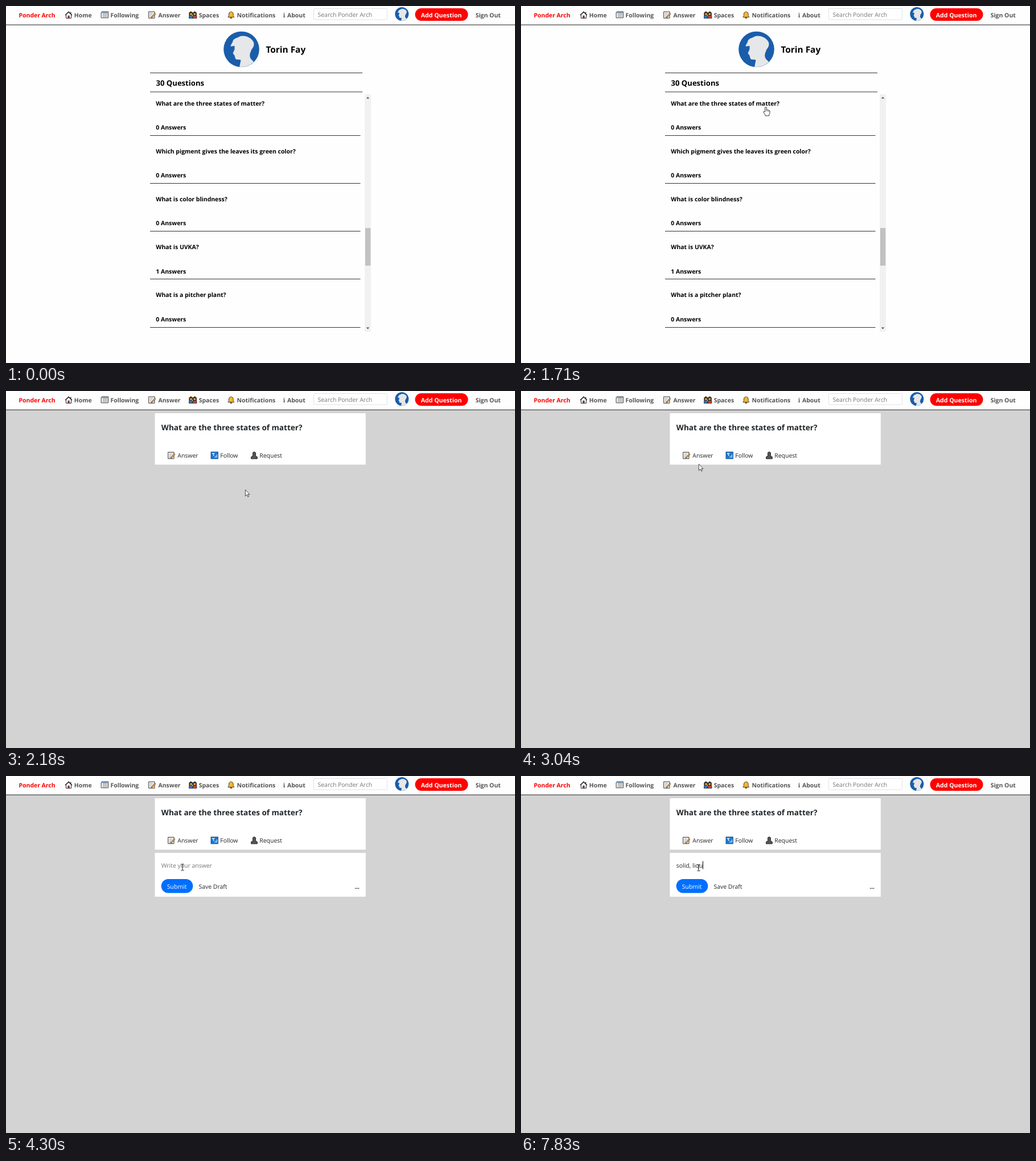
Animation of 894 by 627 pixels, one loop 8000 ms. Source, as an HTML page:

```html
<!DOCTYPE html>
<html lang="en">
<head>
<meta charset="utf-8">
<title>Question page</title>
<style>
html, body { margin: 0; width: 100%; height: 100%; overflow: hidden; background: #fefefe; }
svg { display: block; }
text { font: 10.45px "Open Sans", "Noto Sans", sans-serif; fill: #212529; text-rendering: geometricPrecision; white-space: pre; }
.b { font-weight: 700; fill: #000; }
.nav { font-weight: 700; fill: #555; }
.soft { fill: #757575; }
.line { fill: #333; }
</style>
</head>
<body>
<svg width="894" height="627" viewBox="0 0 894 627">
  <defs>
    <clipPath id="disc"><circle r="31"/></clipPath>
    <g id="avatar">
      <circle r="31.3" fill="#1a5dab"/>
      <path clip-path="url(#disc)" fill="#e6e7e9" d="M-19-5C-18-10-15-12-15-15C-12-20-6-20-2-23C6-25 15-21 19-16C24-11 22-4 18 0C16 5 14 9 15 13C16 18 20 20 23 23L16 34H-4L-1 19C-4 17-10 20-11 15L-12 11L-15 7L-12 0V-6Z"/>
    </g>
    <g id="memo" stroke-linejoin="round">
      <path d="M.7 1H11V12.3H.7Z" fill="#fff" stroke="#333"/>
      <path d="M2.5 3.5H8M2.5 5.7H7M2.5 7.9H5.5M2.5 10H5" stroke="#888" stroke-width=".8"/>
      <path d="M5.5 9.8L11.2 3.2L13 4.8L7.3 11L5 11.6Z" fill="#f2a33a" stroke="#333" stroke-width=".7"/>
    </g>
    <g id="arrow"><path d="M.4.4V11.6L3 9.1L4.8 12.9L6.4 12.2L4.7 8.5H8Z" fill="#fff" stroke="#222" stroke-width=".8"/></g>
    <g id="hand"><path d="M-1.3 9V1.2Q0-.5 1.3 1.2V5.2Q2.8 4.6 3.3 5.8Q4.8 5.2 5.2 6.4Q7 6 7 7.7V11Q6.7 13 5.6 14V15.8H-.9V14.2L-4.2 9.6Q-4.3 7.6-2.5 8.3Z" fill="#fff" stroke="#222" stroke-width=".9"/>
      <path d="M1.3 5V8M3.3 6V8.5M5.2 6.5V9" stroke="#222" stroke-width=".6"/></g>
    <g id="beam"><path d="M-2.7-5.2H-.6L0-4.7L.6-5.2H2.7M-2.7 5.6H-.6L0 5.1L.6 5.6H2.7M0-4.7V5.1" fill="none" stroke="#222"/></g>
  </defs>

  <rect id="back" y="33" width="894" height="594" fill="#d3d3d3"/>
  <rect width="894" height="33" fill="#fefefe"/>
  <rect class="line" y="32.6" width="894" height="1.1"/>

  <text class="nav" x="22.5" y="19.5" style="fill:#f00">Ponder Arch</text>
  <g id="nav"></g>
  <g transform="translate(103.5 9)" stroke="#222">
    <path d="M2 6V12.4H11V6L6.5 1.8Z" fill="#fff"/>
    <path d="M.5 7L6.5 1.2L12.5 7M10.3 4.5V1.5" fill="none" stroke-width="1.2"/>
    <path d="M5.3 12V8.2H7.8V12" fill="#b33" stroke-width=".7"/>
  </g>
  <g transform="translate(166.5 9)">
    <path d="M2 .8H13V11.8H.6V2.5H2Z" fill="#eee" stroke="#444"/>
    <path d="M3 2.7H12" stroke="#4a7fae" stroke-width="1.6"/>
    <path d="M3 5.2H12M3 7.3H12M3 9.5H12M5.5 4V11M8.8 4V11" stroke="#999" stroke-width=".7"/>
  </g>
  <use href="#memo" x="250" y="9"/>
  <g transform="translate(321 9)" stroke="#222" stroke-width=".8">
    <path d="M.5 12.5V9Q4 5.5 7 9.2V12.5Z" fill="#2b78c5"/>
    <path d="M7 12.5V9.2Q10.5 5.5 14 9V12.5Z" fill="#d4472f"/>
    <path d="M.8 8V3Q3.7-1.2 6.7 3V6Z" fill="#3b2618"/>
    <path d="M7.5 8V3Q10.4-1.2 13.4 3V8Z" fill="#3b2618"/>
    <circle cx="4" cy="5.2" r="2.3" fill="#f3a83b"/>
    <circle cx="10.3" cy="5.2" r="2.3" fill="#f3a83b"/>
  </g>
  <g transform="translate(389 9)" stroke="#333" stroke-width=".9">
    <circle cx="6.3" cy="11.3" r="1.6" fill="#d98a1c"/>
    <path d="M.8 10.6L2.4 8.4V5Q2.6 1.8 5.4 1.5Q6.3-.2 7.2 1.5Q10 1.8 10.2 5V8.4L11.8 10.6Z" fill="#fdb827"/>
  </g>
  <text class="nav" x="486.7" y="19.5" style="font-family:'Noto Serif',serif">i</text>
  <rect x="540.5" y="4.5" width="129" height="19.5" rx="2" fill="#fff" stroke="#dfe2e5"/>
  <text class="soft" x="547.5" y="19">Search Ponder Arch</text>
  <use href="#avatar" transform="translate(695.3 14) scale(.383)"/>
  <rect x="718.5" y="4" width="93" height="22" rx="11" fill="#f00"/>
  <text class="nav" x="728.7" y="19.5" style="fill:#fff;font-size:10.6px">Add Question</text>

  <g id="list">
    <use href="#avatar" x="413.5" y="76"/>
    <text class="b" x="456.5" y="82" style="font-size:15.4px">Torin Fay</text>
    <rect class="line" x="253" y="117" width="373" height="1"/>
    <text class="b" x="263.5" y="139.8" style="font-size:13.1px">30 Questions</text>
    <rect class="line" x="253" y="150.4" width="373" height="1"/>
    <g id="rows"></g>
    <rect id="under" x="263.5" y="175.6" width="189.5" height="1"/>
    <rect x="630" y="155" width="11" height="417" fill="#f1f1f1"/>
    <rect x="631" y="390" width="9.3" height="66" fill="#c1c1c1"/>
    <path d="M632.8 162.5h5.4l-2.7-3zM632.8 564.5h5.4l-2.7 3z" fill="#505050"/>
  </g>

  <g id="ask">
    <rect x="261.5" y="39" width="370.3" height="90.3" fill="#fff"/>
    <text class="b" x="272.8" y="68.8" style="font-size:13.55px;fill:#212529">What are the three states of matter?</text>
    <rect id="hover" x="272.7" y="100" width="75.3" height="25" rx="12.5" fill="#d3d3d3"/>
    <use href="#memo" x="284" y="106.5"/>
    <text x="301.3" y="117">Answer</text>
    <rect x="360" y="107" width="12.3" height="12" fill="#1479d8" stroke="#1a3f66" stroke-width=".8"/>
    <path d="M362 109.5L366 113.5M362 109.5H367M364.5 109.5V114M366.5 117V115.5M368.5 117V113.8M370.5 117V111.5" stroke="#fff" stroke-width=".9"/>
    <text x="376.3" y="117">Follow</text>
    <path d="M430.6 119V116Q431.5 114.2 434 113.8Q432 107 436 107Q440 107 438 113.8Q440.5 114.2 441.3 116V119Z" fill="#555" stroke="#222"/>
    <text x="445.3" y="117">Request</text>
  </g>

  <g id="panel">
    <rect x="261.5" y="135" width="370.3" height="77" fill="#fff"/>
    <text id="hint" class="soft" x="272.8" y="161">Write your answer</text>
    <text id="typed" x="272.8" y="161"></text>
    <rect id="caret" y="149.5" width="1" height="14" fill="#000"/>
    <rect x="272.7" y="181" width="55.6" height="24.5" rx="12.25" fill="#006fff"/>
    <text x="282.8" y="197.7" style="fill:#fff">Submit</text>
    <text x="338.5" y="197.7">Save Draft</text>
    <text class="b" x="612.6" y="197.7" style="font-size:9.6px">...</text>
  </g>

  <use id="cursor"/>
</svg>
<script>
const $ = id => document.getElementById(id);
const show = (id, on) => $(id).style.display = on ? '' : 'none';
const label = (cls, x, y, s) => `<text class="${cls}" x="${x}" y="${y}">${s}</text>`;

$('nav').innerHTML = [
  [119.7, 'Home'], [183.5, 'Following'], [267.5, 'Answer'], [338.7, 'Spaces'],
  [405.5, 'Notifications'], [494, 'About'], [824.7, 'Sign Out']
].map(([x, s]) => label('nav', x, 19.5, s)).join('');

$('rows').innerHTML = [
  'What are the three states of matter?',
  'Which pigment gives the leaves its green color?',
  'What is color blindness?', 'What is UVKA?', 'What is a pitcher plant?'
].map((s, i) => {
  const y = i * 84.2;
  return label('b', 263.3, 174.5 + y, s) + label('b', 263.3, 217 + y, (i == 3 ? 1 : 0) + ' Answers') +
    `<rect class="line" x="253" y="${Math.round(226.8 + y)}" width="369.5" height="1"/>`;
}).join('');

// Pointer stops: leave time, arrival time, x, y, easing power across
const moves = [
  [0, 210, 864, 610, 1],
  [210, 1000, 617, 195, 1],
  [1000, 1860, 420, 173, 1.75],
  [2490, 3200, 299, 115, 1.5],
  [3350, 4070, 309, 158, 1],
  [4220, 4380, 311, 163, 1],
  [4380, 4540, 312, 161, 1]
];
const answer = 'solid, liqu';
const keys = [5000, 5150, 5310, 5550, 5630, 5940, 6180, 6490, 6800, 7200, 7830];

function pointer(t) {
  let x = 864, y = 610;
  for (const [from, to, x1, y1, pow] of moves) {
    const p = Math.min(1, Math.max(0, (t - from) / (to - from)));
    x += (x1 - x) * (1 - (1 - p) ** pow);
    y += (y1 - y) * p;
  }
  return [x, y];
}

function draw(t) {
  // The pointer is sampled at a coarse, steady rate
  const step = 78.5, q = 210 + Math.floor((t - 204) / step) * step;
  const [x, y] = pointer(q);
  const list = t < 2020, ask = t >= 2180, panel = t >= 3280;
  const onButton = ask && x < 348 && y < 125;
  const shape = onButton || list && x < 616 ? 'hand' : panel && y > 149 ? 'beam' : 'arrow';

  show('list', list);
  show('back', ask);
  show('ask', ask);
  show('panel', panel);
  show('hover', onButton);
  show('under', x < 453 && y < 176.5);

  const n = keys.filter(k => k <= t).length;
  $('typed').textContent = answer.slice(0, n);
  show('hint', !n);
  show('caret', t >= 4540 && !(t >= 7750 && t < 7830));
  if (panel) $('caret').setAttribute('x', Math.round(272.8 + (n ? $('typed').getComputedTextLength() : 0)));

  show('cursor', t >= 210);
  $('cursor').setAttribute('href', '#' + shape);
  $('cursor').setAttribute('transform', `translate(${Math.round(x)} ${Math.round(y)})`);
}

function tick() {
  draw(performance.now() % 8000);
  requestAnimationFrame(tick);
}
tick();
</script>
</body>
</html>
```
